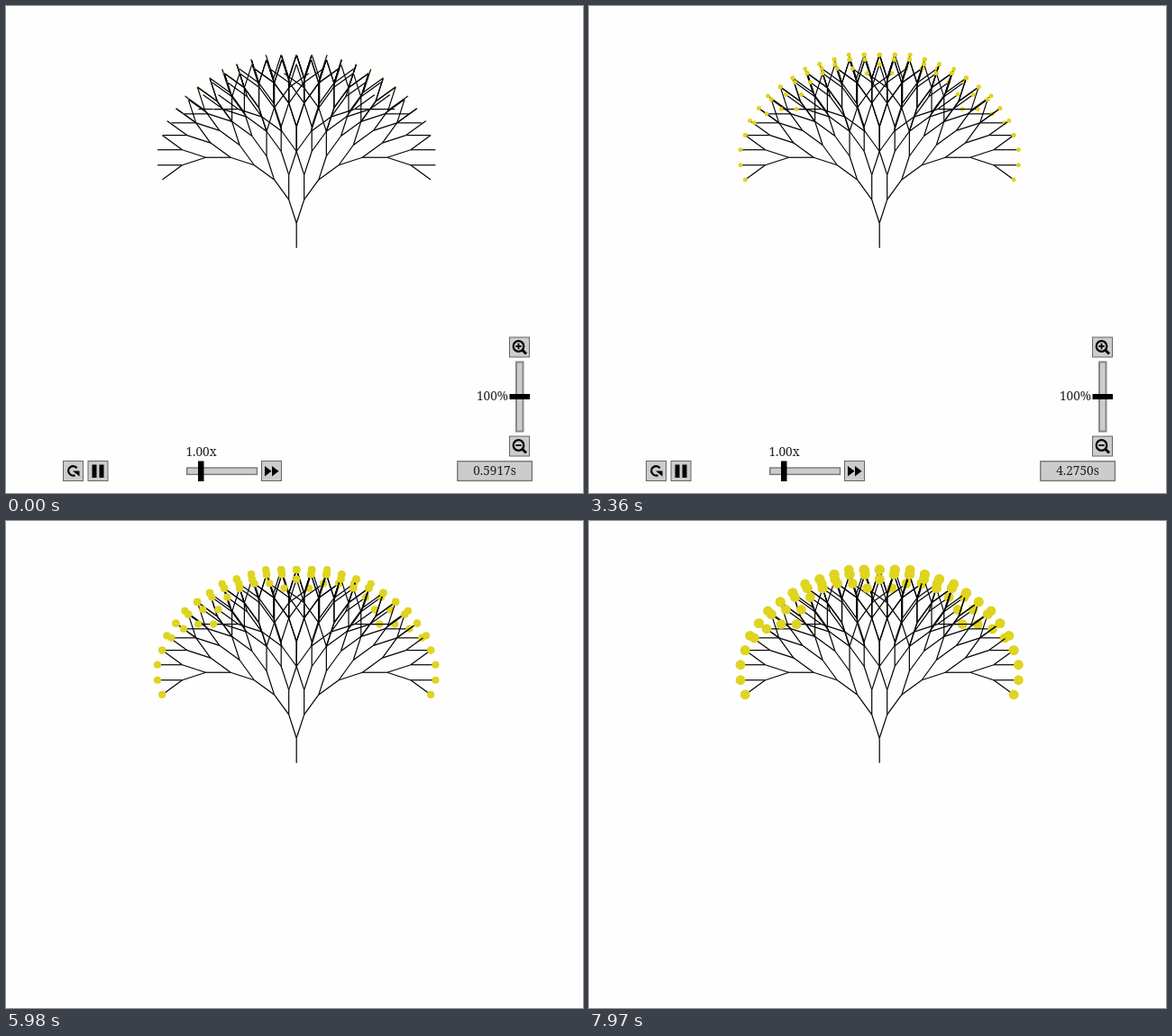
An HTML page with a canvas that plays this animation: 640x541 px, repeating every 8000 ms.

```html
<!DOCTYPE html>
<html lang="en">
<head>
<meta charset="utf-8">
<title>Growing tree</title>
<style>
  html, body { margin: 0; width: 100%; height: 100%; overflow: hidden; background: #fefefe; }
  canvas, svg { position: absolute; left: 0; top: 0; display: block; }
  text { font: 13.6px "Noto Serif", serif; fill: #222; }
  .button { fill: #ccc; stroke: #666; }
  .track { fill: #ccc; stroke: #777; stroke-width: 1.4; }
  .line { fill: none; stroke: #000; stroke-width: 2.2; }
</style>
</head>
<body>
<canvas id="tree" width="640" height="541"></canvas>
<svg id="controls" width="640" height="541" viewBox="0 0 640 541">
  <defs>
    <rect id="button" class="button" x=".5" y=".5" width="22" height="22"/>
    <g id="lens" class="line">
      <circle cx="10.5" cy="10.5" r="5.8"/>
      <path d="M14.5 14.5L19 19" stroke-width="3"/>
    </g>
  </defs>

  <g transform="translate(63 505)">
    <use href="#button"/>
    <path class="line" stroke-width="2.6" d="M15.6 8.3A5.2 5.2 0 1 0 13.5 16.2"/>
    <path d="M11 11.5H18.5V17.5Z"/>
  </g>
  <g transform="translate(90.5 505)">
    <use href="#button"/>
    <path d="M5 4.5H10V19H5ZM13 4.5H18V19H13Z"/>
  </g>

  <text x="199.5" y="500">1.00x</text>
  <rect class="track" x="200.7" y="513" width="77.8" height="7.4"/>
  <rect x="213" y="505.5" width="6.5" height="22.5"/>
  <g transform="translate(283 505)">
    <use href="#button"/>
    <path d="M4 6L11.5 11.7L4 17.5ZM12 6L19.5 11.7L12 17.5Z"/>
  </g>

  <g transform="translate(558 367.5)">
    <use href="#button"/><use href="#lens"/>
    <path class="line" style="stroke-width:1.8" d="M7.3 10.5H13.7M10.5 7.3V13.7"/>
  </g>
  <text x="522" y="438">100%</text>
  <rect x="566" y="395.5" width="7.5" height="77" fill="#ccc" stroke="#888" stroke-width="2"/>
  <rect x="558.5" y="431" width="22.5" height="6"/>
  <g transform="translate(558 477.5)">
    <use href="#button"/><use href="#lens"/>
    <path class="line" style="stroke-width:1.8" d="M7.3 10.5H13.7"/>
  </g>

  <rect class="track" x="500.8" y="505.8" width="82.6" height="21.6"/>
  <text id="clock" x="542" y="521" text-anchor="middle">0.5917s</text>
</svg>
<script>
const LOOP = 8000, TURN = Math.PI / 10, LENGTH = 27.5, LEVELS = 7;
const FADE_START = 46, FADE_STEPS = 6.2;

// Bursts of evenly spaced redraws: first time, last time, number of redraws.
const BURSTS = [
  [110, 880, 8], [950, 1710, 11], [1800, 2520, 9], [2610, 3360, 12], [3450, 4240, 10],
  [4320, 5070, 11], [5140, 5910, 12], [5980, 6750, 12], [6820, 7610, 12], [7700, 7970, 4]
];
// Clock readings by redraw count; the clock stops when the controls fade.
const READINGS = [[0, .5917], [25, 2.9166], [40, 4.2750], [FADE_START, 4.8252]];

const ctx = document.getElementById("tree").getContext("2d");
const controls = document.getElementById("controls");
const clock = document.getElementById("clock");

function redrawCount(time) {
  let count = 0;
  for (const [start, end, steps] of BURSTS) {
    if (time < start) break;
    const gap = (end - start) / (steps - 1);
    count += Math.min(steps, Math.floor((time - start) / gap + 1e-6) + 1);
  }
  return count;
}

function reading(step) {
  for (let i = 1; i < READINGS.length; i++) {
    const [a, from] = READINGS[i - 1], [b, to] = READINGS[i];
    if (step <= b) return from + (to - from) * (step - a) / (b - a);
  }
  return READINGS[READINGS.length - 1][1];
}

function branch(x, y, angle, level, radius) {
  const endX = x + LENGTH * Math.sin(angle);
  const endY = y - LENGTH * Math.cos(angle);
  ctx.beginPath();
  ctx.moveTo(x, y);
  ctx.lineTo(endX, endY);
  ctx.stroke();
  if (level === 0) {
    ctx.beginPath();
    ctx.arc(endX, endY, radius, 0, 2 * Math.PI);
    ctx.fill();
    return;
  }
  branch(endX, endY, angle - TURN, level - 1, radius);
  branch(endX, endY, angle + TURN, level - 1, radius);
}

function draw(step) {
  ctx.clearRect(0, 0, 640, 541);
  ctx.strokeStyle = "#000";
  ctx.fillStyle = "#dfd41f";
  ctx.lineWidth = 1.2;
  branch(322.2, 268.8, 0, LEVELS, .55 + .048 * step);
  clock.textContent = reading(step).toFixed(4) + "s";
  controls.style.opacity = Math.max(0, Math.min(1, 1 - (step - FADE_START) / FADE_STEPS));
}

let shown = -1;
function tick() {
  const step = redrawCount(performance.now() % LOOP);
  if (step !== shown) draw(shown = step);
  requestAnimationFrame(tick);
}
tick();
</script>
</body>
</html>
```
